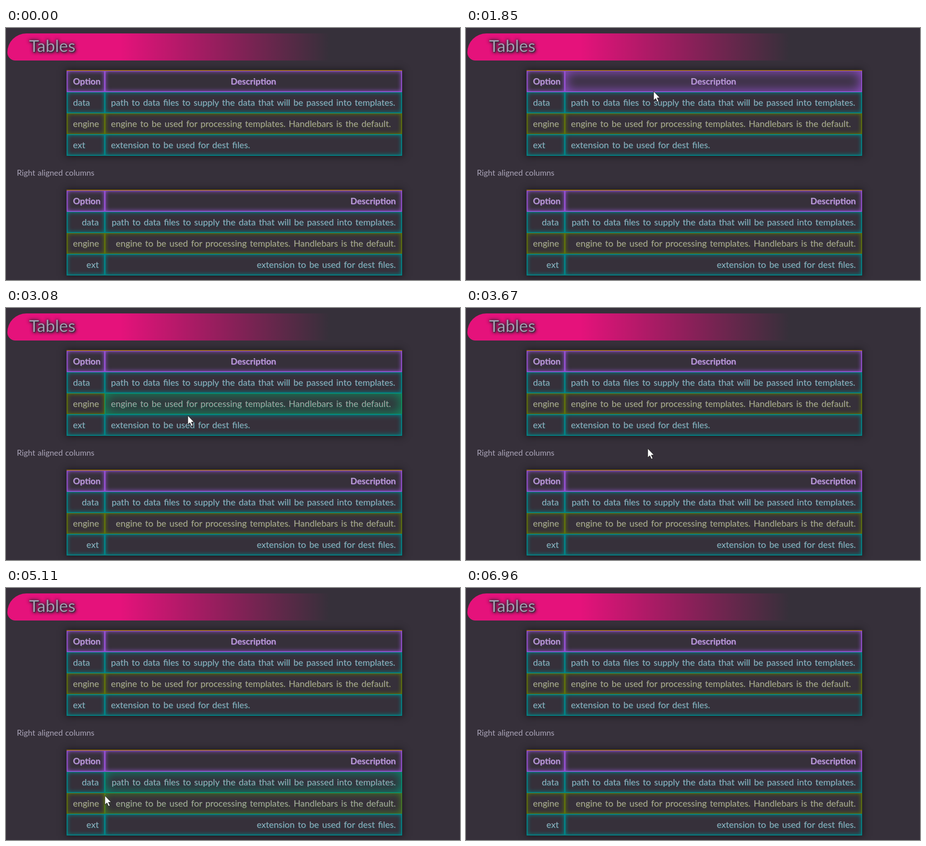
Recreate the animation shown at these times as an HTML page. Size 1004 by 558 pixels, loop 7530 ms.

```html
<!DOCTYPE html>
<html lang="en">
<head>
<meta charset="utf-8">
<title>Tables</title>
<style>
  html, body { margin: 0; width: 100%; height: 100%; overflow: hidden; background: #36303a; }
  body { position: relative; color: #aaa4b8; font: 19.7px/20px Lato, sans-serif; }
  h1, p, .table, .cell, svg { position: absolute; margin: 0; }
  h1 {
    left: 3px; top: 12px; width: 712px; height: 60px; box-sizing: border-box; padding-left: 48px;
    border-radius: 42px 0 0 18px;
    background: linear-gradient(90deg, #e5127b 250px, #8a2059 495px, #36303a00 712px);
    color: #a59bb0; font: 37.5px/53px Lato, sans-serif;
    text-shadow: 1px 1px 1px #2c2631, 2px 2px 5px #2c2631, 0 0 6px #46243f, 0 0 9px #46243f;
  }
  p { left: 24px; top: 311px; font-size: 17.7px; word-spacing: 1px; }
  .table { left: 134px; width: 742px; height: 189px; box-shadow: 0 0 14px 2px #1c191e; background: #36303a; }
  .table::after {
    content: ""; position: absolute; z-index: 4; inset: -1px 0 auto; height: 2px; background: #96690f;
  }
  .cell {
    --h: 0; --now: color-mix(in srgb, var(--tone), var(--lit) calc(var(--h) * 100%));
    box-sizing: border-box; height: 48px; padding: 0 12px; line-height: 44px;
    white-space: nowrap; word-spacing: 2px;
    border: 2px solid var(--now);
    background: color-mix(in srgb, var(--now) calc(var(--h) * 5%), transparent);
    box-shadow: inset 0 0 calc(10px + var(--h) * 16px) var(--now);
    text-shadow: 1px 1px 1px color-mix(in srgb, var(--now) 70%, transparent);
  }
  .odd { --tone: #028487; --lit: #079169; z-index: 2; color: #9fa6b6; }
  .even { --tone: #5f720c; --lit: #0b9163; z-index: 1; color: #a5a2a4; }
  .head { --tone: #9550d2; --lit: #9550d2; z-index: 3; color: #b59dce; font-weight: 700; font-size: 19.4px; }
  svg { left: 0; top: 0; z-index: 9; overflow: visible; }
</style>
</head>
<body>
<h1>Tables</h1>
<p>Right aligned columns</p>
<svg id="cursor" width="1" height="1">
  <path id="arrow" d="M0 0V20L4.6 15.8 8 23.4 11.2 22 7.8 14.6H14Z" fill="#fff" stroke="#222"/>
  <g id="beam" fill="none">
    <path d="M-5-9H-1.5L0-8 1.5-9H5M0-8V8M-5 9H-1.5L0 8 1.5 9H5" stroke="#222" stroke-width="3"/>
    <path d="M-5-9H-1.5L0-8 1.5-9H5M0-8V8M-5 9H-1.5L0 8 1.5 9H5" stroke="#d8dcdc" stroke-width="1.3"/>
  </g>
</svg>
<script>
const LOOP = 7530, FADE = 300, ROW = 47;
const rows = [
  ["Option", "Description"],
  ["data", "path to data files to supply the data that will be passed into templates."],
  ["engine", "engine to be used for processing templates. Handlebars is the default."],
  ["ext", "extension to be used for dest files."],
];
// Pointer path: time, x, y
const path = [
  [740, 425, -20], [1100, 420, 70], [1470, 417, 118], [1850, 415, 140], [2050, 408, 175],
  [2250, 403, 209], [2780, 403, 209], [3100, 402, 240], [3370, 402, 282], [3520, 402, 286],
  [3670, 402, 311], [4000, 378, 355], [4300, 320, 394], [4400, 298, 405], [4580, 270, 410],
  [4950, 225, 450], [5060, 219, 456], [5400, 217, 482], [5820, 205, 523], [6420, 205, 523],
  [6660, 208, 562],
];
const $ = id => document.getElementById(id);
const clamp = v => Math.min(1, Math.max(0, v));
const ease = v => { v = clamp(v); return v * v * (3 - 2 * v); };

function pointer(t) {
  const i = path.findIndex(p => p[0] > t);
  if (i < 1) return null;
  const [t0, x0, y0] = path[i - 1], [t1, x1, y1] = path[i];
  const k = (t - t0) / (t1 - t0);
  return { x: x0 + (x1 - x0) * k, y: y0 + (y1 - y0) * k };
}

function addTable(top, bodyAlign, headAlign) {
  const table = document.createElement("div");
  table.className = "table";
  table.style.top = top + "px";
  document.body.append(table);
  return rows.flatMap((row, r) => row.map((text, c) => {
    const el = document.createElement("div"), label = document.createElement("span");
    const left = c ? 84 : 0, width = c ? 658 : 85;
    el.className = "cell " + (r ? (r % 2 ? "odd" : "even") : "head");
    el.style.cssText = `left:${left}px;top:${r * ROW}px;width:${width}px;text-align:${r ? bodyAlign : headAlign}`;
    label.textContent = text;
    el.append(label);
    table.append(el);
    const span = label.getBoundingClientRect();
    return { el, x: 134 + left, y: top + r * ROW, w: c ? 658 : 84, from: span.left, to: span.right + 2 };
  }));
}

const cells = [...addTable(94, "left", "center"), ...addTable(359, "right", "right")];
const cellAt = p => cells.find(c => p.x >= c.x && p.x < c.x + c.w && p.y >= c.y && p.y < c.y + ROW);

// Each cell is visited at most once per loop
for (let t = 0; t < LOOP; t += 5) {
  const p = pointer(t), cell = p && cellAt(p);
  if (!cell) continue;
  cell.enter ??= t;
  cell.leave = t;
}

function draw(now) {
  const t = now % LOOP, p = pointer(t);
  for (const c of cells) {
    if (c.enter === undefined) continue;
    const level = ease((Math.min(t, c.leave) - c.enter) / FADE) * (1 - ease((t - c.leave) / FADE));
    c.el.style.setProperty("--h", level.toFixed(3));
  }
  $("cursor").style.display = p ? "" : "none";
  if (p) {
    const c = cellAt(p);
    const onText = c && p.x >= c.from && p.x <= c.to && Math.abs(p.y - c.y - 24) < 12;
    $("cursor").style.transform = `translate(${p.x}px, ${p.y}px)`;
    $("arrow").style.display = onText ? "none" : "";
    $("beam").style.display = onText ? "" : "none";
  }
}

const start = performance.now();
function tick() {
  draw(performance.now() - start);
  requestAnimationFrame(tick);
}
tick();
</script>
</body>
</html>
```
